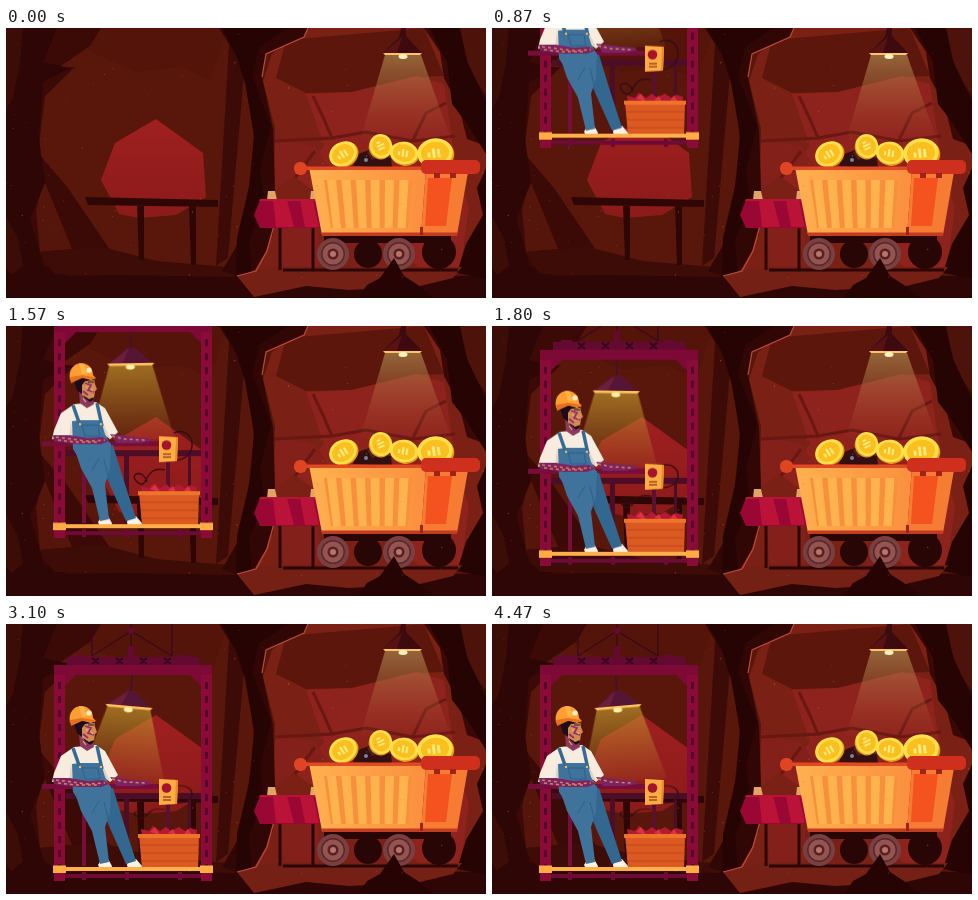
Animation of 480 by 270 pixels, one loop 4.54 s. Source, as an HTML page:

```html
<!DOCTYPE html>
<html lang="en">
<head>
<meta charset="utf-8">
<title>Mine lift</title>
<style>
html, body { margin: 0; width: 100%; height: 100%; overflow: hidden; background: #260303; }
svg { display: block; width: 100vw; height: 100vh; }
#lift { animation: descend 4540ms infinite; }
#lamp { transform-origin: 125px 66px; animation: swing 4540ms linear infinite; }
#cable { transform-origin: 166px 180px; animation: settle 4540ms infinite; }
@keyframes descend {
  0% { transform: translateY(-260px); animation-timing-function: linear; }
  19.16% { transform: translateY(-137.5px); animation-timing-function: linear; }
  29.3% { transform: translateY(-80px); animation-timing-function: linear; }
  34.58% { transform: translateY(-45px); animation-timing-function: cubic-bezier(.33, .67, .67, 1); }
  48%, 100% { transform: none; }
}
@keyframes swing {
  0% { transform: rotate(-2deg); }
  19% { transform: rotate(-4deg); }
  29.3% { transform: rotate(-2deg); }
  34.6% { transform: rotate(-1deg); }
  51.3% { transform: rotate(5deg); }
  60% { transform: rotate(6deg); }
  68.3% { transform: rotate(5deg); }
  84% { transform: rotate(-1deg); }
  98.5%, 100% { transform: rotate(-5deg); }
}
@keyframes settle {
  0%, 34% { transform: none; animation-timing-function: ease-out; }
  50%, 100% { transform: scaleY(.6); }
}
</style>
</head>
<body>
<svg viewBox="0 0 480 270" preserveAspectRatio="none">
<defs>
  <linearGradient id="glow" x1="0" y1="0" x2="0" y2="1">
    <stop offset="0" stop-color="#c39c2c" stop-opacity=".65"/>
    <stop offset="1" stop-color="#b98a28" stop-opacity=".1"/>
  </linearGradient>
  <linearGradient id="haze" x1="0" y1="0" x2="0" y2="1">
    <stop offset="0" stop-color="#b89a58" stop-opacity=".6"/>
    <stop offset="1" stop-color="#c0603c" stop-opacity=".04"/>
  </linearGradient>
  <linearGradient id="vein" x1="0" y1="0" x2="0" y2="1">
    <stop offset="0" stop-color="#a01f20"/>
    <stop offset="1" stop-color="#8a1b19"/>
  </linearGradient>
  <linearGradient id="front">
    <stop offset="0" stop-color="#ffb04f"/>
    <stop offset="1" stop-color="#fb8f3f"/>
  </linearGradient>
  <g id="wheel">
    <circle r="16" fill="#7a4041"/>
    <circle r="12" fill="#5a262b"/>
    <circle r="10.5" fill="#945550"/>
    <circle r="5.5" fill="#571f26"/>
    <circle r="3" fill="#b87466"/>
  </g>
  <g id="coin">
    <ellipse cx="1" cy="1.5" rx="14.5" ry="12" fill="#ee9a16"/>
    <ellipse rx="14.5" ry="12" fill="#ffe04a"/>
    <ellipse rx="11.5" ry="9.2" fill="#fbbf20"/>
    <path d="M-5 3V-1M-1 4V-4M3 4V-3" stroke="#ffe978" stroke-width="2.4"/>
  </g>
</defs>

<!-- left cave -->
<path fill="#59170c" d="M0 0H480V270H0Z"/>
<path fill="#4b1109" d="M92 0H222L204 52 175 39 130 44 82 22Z" opacity=".4"/>
<path fill="url(#vein)" d="M150 91 109 115 95 152 113 186 133 190 170 187 200 169 197 125Z"/>
<path fill="#3b0a06" d="M0 0H95L84 18 52 40 69 39 39 68 32 125 62 160 115 238 240 240V270H0Z"/>
<path fill="#55150b" d="M38 152 66 221 34 224 30 182Z"/>
<path fill="#4b1209" d="M6 160 17 145 20 200 11 238Z"/>
<path fill="#2d0605" d="M0 0H51L37 34 64 40 37 54 33 110 39 155 24 190 38 238 62 248 240 245 480 248V270H0Z"/>
<path fill="#54150b" d="M0 0H17L14 35 7 70 0 82ZM0 188 12 210 17 238 5 247 0 240Z" opacity=".4"/>
<path fill="#3d0c07" d="M33 224 96 219 151 233 235 240 228 249 48 246Z"/>
<g fill="#2e0705">
  <path d="M79 169 212 172V179L82 177ZM131 177H138V232H133ZM183 178H190V237H185Z"/>
  <path d="M224 0H242L222 230 210 238Z" fill="#3d0b07"/>
</g>

<!-- right cave -->
<path fill="#7a2015" d="M302 0H480V242H242L267 207 269 100 257 53 266 26Z"/>
<path fill="#5d160b" d="M280 12 418 0 438 48 410 49 346 64 300 65 270 50Z"/>
<path fill="#8e221c" d="M300 66 346 64 410 48 438 56 450 138 463 180 455 240H414L290 150 318 118Z"/>
<path fill="#832019" d="M269 110 309 118 322 138 287 149 268 162ZM274 200H313V238H278Z"/>
<path fill="none" stroke="#681711" stroke-width="3" d="M268 113 326 110 317 89 307 68M326 110 360 104 407 113 449 108M407 112 420 85 440 75M289 150 309 123"/>
<path fill="#3a0906" d="M418 0H480V118L461 111 453 79 438 50 434 24Z"/>
<path fill="#4d1209" d="M452 0H480V67L465 46Z"/>
<path fill="#270404" d="M423 0H454L461 33 480 73V126L460 94 446 76 441 34ZM480 140 471 160 477 187 460 216 451 245 480 251Z"/>
<path fill="#310705" d="M213 0H302L298 9 260 26 256 49 267 101 270 190 260 223 249 242 230 248 216 243 238 205 248 110 239 42Z"/>
<path fill="#260404" d="M216 0H282L253 19 246 48 265 98 254 142 258 175 243 213 246 244 230 250 231 210 245 150 248 106 239 55 230 26Z"/>
<path fill="#742014" d="M231 248 251 242 272 239H456L447 250 414 258 343 262 300 258 272 264 248 269Z"/>
<path fill="none" stroke="#bd4a38" stroke-width="1.2" d="M302 0 298 9 260 26 256 49M270 190 261 223 250 243 231 248"/>

<!-- hanging light -->
<path fill="url(#haze)" d="M379 27H415L445 112H354Z"/>
<path fill="#3d0a10" d="M395 0H400V8L416 25H377L393 9Z"/>
<path fill="#571313" d="M396 9 391 25H377Z"/>
<path fill="#ffc362" d="M377 25H416L414 27H379Z"/>
<ellipse cx="397" cy="28.5" rx="4.5" ry="2.5" fill="#fff3bb"/>

<!-- bench -->
<path stroke="#2c0605" stroke-width="3" fill="none" d="M274 199V242M307 199V242M277 242H452"/>
<path fill="#e1a467" d="M262 163H269L271 172H261ZM305 163H312L313 172H304Z"/>
<path fill="#9b0734" d="M254 172 315 171V200H254L248 187Z"/>
<path fill="#bb1238" d="M267 172H281L288 199H270ZM294 172H307L313 199H299Z"/>
<path fill="#b51636" d="M254 171H315V173H253Z"/>

<!-- cart -->
<g fill="#280605">
  <path d="M318 206H445V215H318Z"/>
  <circle cx="433" cy="224" r="17"/>
  <circle cx="362" cy="226" r="14"/>
</g>
<path fill="#31100f" d="M347 138 352 126 366 121 376 128 385 130 386 140Z"/>
<path fill="#572019" d="M361 124 369 121 375 128 366 132Z"/>
<circle cx="360" cy="132" r="2" fill="#7186a2"/>
<use href="#coin" transform="translate(337 126) rotate(-32)"/>
<use href="#coin" transform="translate(375 118) rotate(65) scale(.84 .94)"/>
<use href="#coin" transform="translate(398 125) rotate(8) scale(.98 .94)"/>
<use href="#coin" transform="translate(429 125) rotate(-8) scale(1.23 1.22)"/>
<path fill="url(#front)" d="M303 139 420 141 415 207H316Z"/>
<path fill="#f67c33" d="M420 141 462 144 451 207H415Z"/>
<path fill="#f4521f" d="M422 150H446L440 198H419Z"/>
<path fill="#f88f3d" d="M318 152H406L402 200H325Z"/>
<g id="slats" fill="#ffb34e"></g>
<path fill="#c23c20" d="M316 204.5H451V208H316Z"/>
<path fill="#df4a22" d="M300 138.5H418V142H300Z"/>
<rect x="288" y="134" width="13" height="13" rx="6" fill="#df4423"/>
<rect x="415" y="132" width="59" height="14" rx="5" fill="#cf301e"/>
<path fill="#9e241b" d="M428 145H434V150H428ZM444 145H450V150H444ZM414 199H417V207H414Z"/>
<use href="#wheel" x="327" y="226"/>
<use href="#wheel" x="393" y="226"/>
<path fill="#270404" d="M352 270 361 257 374 250 388 230 398 248 412 257 428 270Z"/>
<g id="dust" fill="#c8683d"></g>

<!-- lift -->
<g id="lift">
  <path fill="none" stroke="#380820" stroke-width="1.2" d="M125 7 86 32M125 7 166 32M86 0V32M166 0V32M125 0V32"/>
  <path fill="#640a32" d="M61 33H193V41H61ZM69 31H80V34H69ZM172 31H183V34H172ZM122 22H128V33H122Z"/>
  <circle cx="125" cy="7" r="3" fill="#640a32"/>
  <path id="truss" fill="none" stroke="#33061b" stroke-width="2"/>
  <path fill="#7d0936" d="M48 41H206V51H48ZM59 51H70L59 62ZM195 51H184L195 62Z"/>
  <path fill="#8a0a38" d="M48 51H59V257H48ZM195 51H206V257H195Z"/>
  <path id="lattice" fill="none" stroke="#54092b" stroke-width="3"/>
  <path fill="#4c0d27" d="M60 169H195V175H60ZM118 170H123V242H118ZM182 174H185V242H182Z"/>
  <g id="lamp">
    <path fill="url(#glow)" d="M103 84H146L167 158H82Z"/>
    <path fill="#4a0e2c" d="M124 51H126V68H124Z"/>
    <path fill="#551534" d="M121 67H129L147 83H102Z"/>
    <path fill="#6c1f3b" d="M123 67 116 83H102Z"/>
    <path fill="#ffc25a" d="M101 82H148L146 84.5H103Z"/>
    <ellipse cx="124" cy="86" rx="4.5" ry="2.4" fill="#fff0a8"/>
  </g>
  <path id="cable" fill="none" stroke="#350d17" stroke-width="1.4" d="M168 179C195 179 189 142 168 151M159 189C137 184 143 210 132 202C121 193 137 187 141 201"/>
  <path fill="#760d3b" d="M36 160H155V165H36ZM76 165H80V242H76Z"/>
  <path fill="#5b102e" d="M160 179H164V211H160Z"/>

  <path fill="#b51a33" d="M136 212 135 205 143 207 147 202 154 207 160 203 165 207 173 203 179 207 184 204 191 206 190 214Z"/>
  <path fill="#dc3340" d="M144 208 149 203 154 211ZM162 209 167 205 170 211ZM178 210 182 205 186 211Z"/>
  <path fill="#dc5a22" d="M133 211H193L192 244H136Z"/>
  <path fill="#ee742c" d="M132 210H194V214H132Z"/>
  <path stroke="#bb451d" d="M134 221H193M135 229H193M135 237H192"/>
  <path fill="#ffac43" d="M153 155 172 156 171 180 153 181Z"/>
  <path fill="#e88a2e" d="M170 156H172L171 180H169Z"/>
  <circle cx="160.5" cy="164" r="4.8" fill="#a5142d"/>
  <path stroke="#a04a20" stroke-width="1.5" d="M157 173H165M157 176H165"/>

  <!-- worker -->
  <path fill="#fff1e3" d="M92 241 95 236 102 235 106 242 105 245H94ZM121 241 122 236 130 235 136 242 135 245H122Z"/>
  <path fill="#326790" d="M88 165 107 164 118 200 130 237 120 240 103 202Z"/>
  <path fill="#3f739b" d="M67 163 105 162 104 188 99 203 103 238 94 240 86 207 75 187Z"/>
  <path fill="#f8ecdf" d="M68 123 90 121 99 127 112 151 104 158 96 151 98 162 68 164 65 156 46 158 48 149 55 132Z"/>
  <path fill="#e4d2c5" d="M94 135 104 157 97 154ZM65 138 67 160 63 158Z"/>
  <path fill="#3f739b" d="M66 140 74 139 95 139 99 153 105 164 103 176 75 180 67 168Z"/>
  <path stroke="#356a95" stroke-width="3.5" d="M67 124 74 144M91 122 96 145"/>
  <path fill="none" stroke="#2f6089" d="M76 144H92L94 155H79ZM93 177 86 189M98 178 104 202"/>
  <circle cx="74" cy="143" r="1.2" fill="#f3c154"/>
  <circle cx="95" cy="143" r="1.2" fill="#f3c154"/>
  <path fill="#8a3a5c" d="M73 109 86 111 88 123 81 127 74 122Z"/>
  <path fill="#d58a50" d="M73 97 88 97 89 103 91 108 89 110 88 117 83 120 76 114Z"/>
  <path fill="#1c0c18" d="M67 96 88 96 88 99 79 100 76 104 76 113 71 109ZM77 114 83 118 88 116 87 119 82 122Z"/>
  <path fill="none" stroke="#8c2f73" stroke-width="1.7" d="M79 102 85 104 82 109 88 111M77 110 82 114M79 118 84 122"/>
  <path stroke="#eda95f" stroke-width="1.2" d="M80 105 82 107M85 108 87 110M77 117 80 121"/>
  <path stroke="#301020" d="M82 101H88"/>
  <path fill="#ff9e30" d="M64 99C62 88 68 82 76 82C84 83 87 88 87 94L90 97 85 99 75 96Z"/>
  <path fill="#e5701f" d="M64 96 76 94 89 96 87 98 76 97 65 102Z"/>
  <path fill="#ffb449" d="M73 82 78 83 81 92 76 93Z"/>
  <circle cx="83" cy="89" r="2.6" fill="#fff0bd"/>
  <path fill="#7c2462" d="M47 154 64 154 82 157 97 156 103 160 95 163 72 163 48 160ZM104 153 114 154 130 156 143 157 145 160 133 162 111 162Z"/>
  <path fill="none" stroke="#d4855a" stroke-width="1.5" stroke-dasharray="3 3" d="M50 156 66 158 80 160 99 159M106 155 119 158 140 159M52 159 70 161 92 161"/>

  <path fill="#6d0a35" d="M59 250H195V254H59ZM76 248H80V256H76ZM119 248H123V256H119ZM172 248H176V256H172Z"/>
  <path fill="#ffb04a" d="M52 243H202V247H52Z"/>
  <path fill="#ffac43" d="M47 241.5H60V249H47ZM194 241.5H207V249H194Z"/>
</g>
</svg>
<script>
const id = name => document.getElementById(name);
const range = (n, fn) => Array.from({ length: n }, (_, i) => fn(i)).join('');

id('slats').innerHTML = range(6, i => {
  const x = 321 + i * 14.5, lean = 5 - i * 1.6;
  return `<path d="M${x} 152h9l${lean} 48h-8Z"/>`;
});
id('truss').setAttribute('d', range(4, i => `M${86 + i * 24} 34l7 6m0-6l-7 6`));
id('lattice').setAttribute('d', range(14, i => `M53.5 ${58 + i * 14}v7M200.5 ${58 + i * 14}v7`));

let seed = 73;
const random = () => (seed = seed * 16807 % 2147483647) / 2147483647;
id('dust').innerHTML = range(100, () =>
  `<circle cx="${random() * 480}" cy="${random() * 258}" r="${.3 + random() * .35}" opacity="${.3 + random() * .4}"/>`);
</script>
</body>
</html>
```
